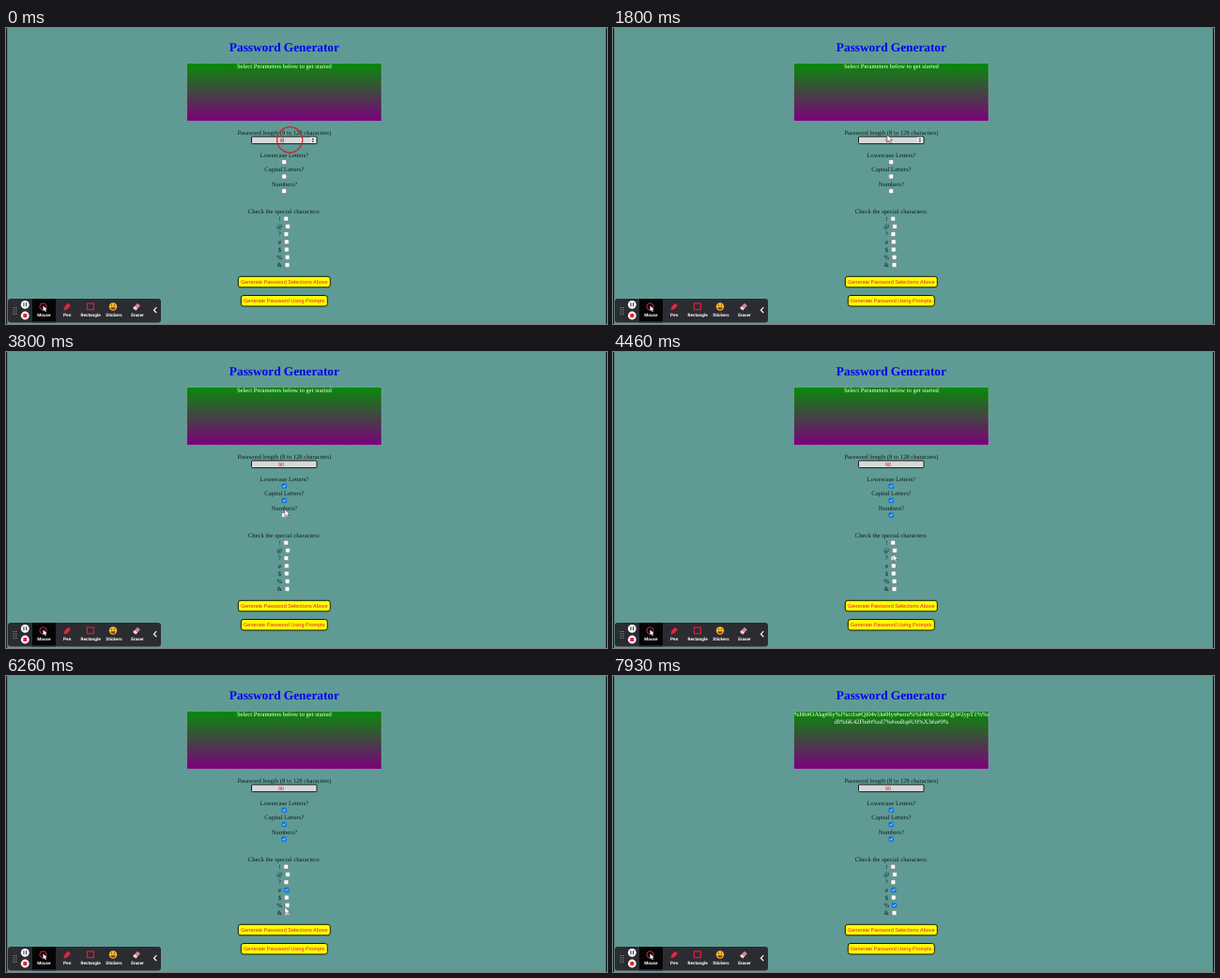
Write an HTML page that moves like this. It is 640 px wide and 316 px high and loops after 8000 ms.

```html
<!DOCTYPE html>
<html lang="en">
<head>
<meta charset="utf-8">
<title>Password Generator</title>
<style>
html, body { margin: 0; width: 100%; height: 100%; overflow: hidden; background: #5f9b94; }
svg { display: block; width: 100%; height: 100%; }
text { text-rendering: geometricPrecision; text-anchor: middle; white-space: pre; }
.page { font: 6.64px "Liberation Serif", "Times New Roman", serif; fill: #101c1b; }
.title { font-weight: bold; font-size: 13.3px; fill: #0000f0; }
.output { fill: #fff; }
.control { font: 5.53px "Liberation Sans", Arial, sans-serif; fill: #dc143c; }
.tool { font: bold 4.7px Roboto, sans-serif; fill: #fff; }
</style>
</head>
<body>
<svg id="stage" viewBox="0 0 640 316">
  <defs>
    <linearGradient id="fade" x2="0" y2="1">
      <stop stop-color="#088a08"/><stop offset="1" stop-color="#7c007c"/>
    </linearGradient>
    <clipPath id="boxClip"><rect x="192.5" y="37.5" width="207.5" height="62"/></clipPath>
  </defs>
  <rect width="640" height="316" fill="#5f9b94"/>
  <path d="M.6 0V316M639.4 0V316" stroke="#101817" stroke-width="1.2"/>
  <rect x="192.5" y="37.5" width="207.5" height="62" fill="url(#fade)" stroke="#9bb5b0" stroke-width=".7" stroke-dasharray="1.2 .5"/>
  <g id="page"></g>
  <g id="password" class="page" clip-path="url(#boxClip)">
    <text class="output" x="192.7" y="43.4" style="text-anchor:start">%H6#OAkg#Ry%J%ci1s#QI04v5k#Hyt#wou%%I4t#K%3J#Qj3#2ypT1%%c</text>
    <text class="output" x="296.5" y="51">iB%6K42Fhi#t%oI7%#ouRq#U0%X3#z#9%</text>
  </g>

  <rect x="261.5" y="116" width="69.5" height="7.6" rx="1" fill="#d8d8d8" stroke="#1c1c1c"/>
  <text id="length" class="control" x="293" y="121.7"></text>
  <path id="caret" d="M295.2 117.3v5" stroke="#222" stroke-width=".6"/>
  <g id="spinner">
    <rect x="324" y="116.7" width="5.8" height="6.2" fill="#efefef"/>
    <path d="M325.3 119.2l1.5-1.8 1.5 1.8zm0 1.2l1.5 1.8 1.5-1.8z" fill="#333"/>
  </g>
  <g id="boxes"></g>

  <rect x="2" y="289" width="163" height="25.5" rx="3" fill="#2b2c31"/>
  <rect x="28" y="289" width="25" height="25.5" fill="#050505"/>
  <path d="M28 314H53" stroke="#32627a" stroke-width=".8"/>
  <path d="M8.2 298v8M10.8 298v8" stroke="#b0b0b3" stroke-width="1" stroke-dasharray="1 1.3"/>
  <circle cx="20.3" cy="295.3" r="4.4" fill="#fff"/>
  <path d="M19 293.3v4M21.6 293.3v4" stroke="#333" stroke-width="1.1"/>
  <circle cx="20.3" cy="307" r="4.4" fill="#fff"/>
  <rect x="18.3" y="305" width="4" height="4" rx=".5" fill="#e0203c"/>
  <circle cx="39.5" cy="297.4" r="3.6" fill="none" stroke="#d4273f" stroke-width="1"/>
  <path d="M39.5 296.5v5.7l1.4-1.2 1 2 1-.5-1-2h1.8z" fill="#fff"/>
  <path d="M61.5 301.5l1-4 3.6-3.8 2.8 2.6-3.6 4z" fill="#e5243f"/>
  <rect x="86.4" y="294" width="7" height="6.6" fill="none" stroke="#d41f3a" stroke-width="1.3"/>
  <circle cx="114" cy="297.5" r="4.2" fill="#f6b72b"/>
  <path d="M111.5 298.2a2.5 2.5 0 0 0 5 0z" fill="#7c3d16"/>
  <path d="M112.5 295.3v1.5M115.5 295.3v1.5" stroke="#5c3512" stroke-width=".8"/>
  <path d="M135.2 299l4.8-5.2 3 2.6-4.8 5z" fill="#dc8294"/>
  <path d="M135.2 299l1.8-2 3 2.6-1.8 1.8z" fill="#f2d7dc"/>
  <path d="M160.3 298.2l-2.8 3 2.8 3" fill="none" stroke="#fff" stroke-width="1.2"/>
  <g id="tools"></g>

  <circle id="ring" r="13.6" fill="none" stroke="#c62836" stroke-width="1.3"/>
  <path id="arrow" d="M0 0V7.6L1.8 6 3.1 9 4.5 8.4 3.2 5.5H5.6Z" fill="#fff" stroke="#333" stroke-width=".5"/>
</svg>
<script>
const LOOP = 8000;
const $ = id => document.getElementById(id);

function add(parent, tag, attrs, content) {
  const node = document.createElementNS("http://www.w3.org/2000/svg", tag);
  for (const name in attrs) node.setAttribute(name, attrs[name]);
  if (content) node.textContent = content;
  $(parent).append(node);
  return node;
}
const label = (content, x, y, style = "page", parent = "page") =>
  add(parent, "text", { x, y, class: style }, content);
const show = (node, visible) => node.style.display = visible ? "" : "none";

label("Password Generator", 296.4, 24.5, "page title");
const intro = label("Select Perameters below to get started", 296.4, 43.4, "page output");
label("Password length (8 to 128 characters)", 296.4, 113.7);
label("Check the special characters:", 296.4, 198.2);

function button(content, x, y, width) {
  add("page", "rect", { x, y, width, height: 11.5, rx: 2.6, fill: "#ffff00", stroke: "#181800", "stroke-width": 1 });
  label(content, x + width / 2, y + 7.6, "control");
}
button("Generate Password Selections Above", 247.3, 265.3, 98);
button("Generate Password Using Prompts", 250.3, 285.5, 92);

// Each box: centre, and the time it becomes ticked.
const boxes = [];
function checkbox(x, y, tickedAt = Infinity) {
  const rect = add("boxes", "rect", { x: x - 2.4, y: y - 2.4, width: 4.8, height: 4.8, rx: .8, "stroke-width": .6 });
  const tick = add("boxes", "path", { d: `M${x - 1.5} ${y}l1.1 1.2 2-2.4`, fill: "none", stroke: "#fff", "stroke-width": .8 });
  boxes.push({ rect, tick, tickedAt });
}
[["Lowercase Letters?", 137.5, 143.1, 3020], ["Capital Letters?", 153.4, 158.5, 3450], ["Numbers?", 168.9, 174.1, 4020]]
  .forEach(([content, textY, boxY, time]) => {
    label(content, 296.4, textY);
    checkbox(296.2, boxY, time);
  });
[["!", 298.2], ["@", 300], ["?", 298.4], ["#", 298.8, 4760], ["$", 298.8], ["%", 299.6, 6560], ["&", 299.5]]
  .forEach(([sign, x, time], i) => {
    const y = 203.6 + i * 8.23;
    label(sign, 291.3, y + 2.3);
    checkbox(x, y, time);
  });

["Mouse", "Pen", "Rectangle", "Stickers", "Eraser"].forEach((name, i) =>
  label(name, 40.3 + i * 24.9, 308.4, "tool", "tools"));

// Cursor tip stops: time, x, y.
const stops = [
  [0, 301, 119], [900, 301, 119], [1500, 292, 114], [2200, 292, 114],
  [2850, 297.5, 142.5], [3120, 297.5, 143], [3350, 296.5, 158], [3520, 296.5, 158],
  [3800, 296.8, 168], [3940, 296.5, 174], [4150, 296.5, 174], [4600, 298.5, 228],
  [4850, 298.5, 228], [5130, 298, 235.5], [5700, 299, 243], [6260, 296.8, 246.5],
  [6450, 299, 245], [6750, 299, 245], [7150, 297, 270], [8000, 297, 270]
];
const clicks = [0, 2950, 3390, 3960, 4690, 6490, 7250];

function cursorAt(time) {
  const i = Math.max(1, stops.findIndex(stop => stop[0] > time));
  const [t0, x0, y0] = stops[i - 1], [t1, x1, y1] = stops[i];
  const p = (time - t0) / (t1 - t0), ease = p * p * (3 - 2 * p);
  return [x0 + (x1 - x0) * ease, y0 + (y1 - y0) * ease];
}

function draw(now) {
  const time = now % LOOP;
  const [x, y] = cursorAt(time);
  const generated = time >= 7330;

  show(intro, !generated);
  show($("password"), generated);
  $("length").textContent = time < 900 ? "8" : time < 1200 ? "9" : "90";
  show($("caret"), time < 500 || time > 1000 && time < 1500);
  show($("spinner"), time < 2450);
  for (const { rect, tick, tickedAt } of boxes) {
    const ticked = time >= tickedAt;
    rect.setAttribute("fill", ticked ? "#0875e8" : "#fff");
    rect.setAttribute("stroke", ticked ? "#0875e8" : "#777");
    show(tick, ticked);
  }
  show($("arrow"), time > 1350 && time < 7600);
  $("arrow").setAttribute("transform", `translate(${x} ${y})`);
  show($("ring"), clicks.some(start => time >= start && time < start + 230));
  $("ring").setAttribute("transform", `translate(${x + 1.2} ${y + .3})`);
  requestAnimationFrame(draw);
}
draw(0);
</script>
</body>
</html>
```
